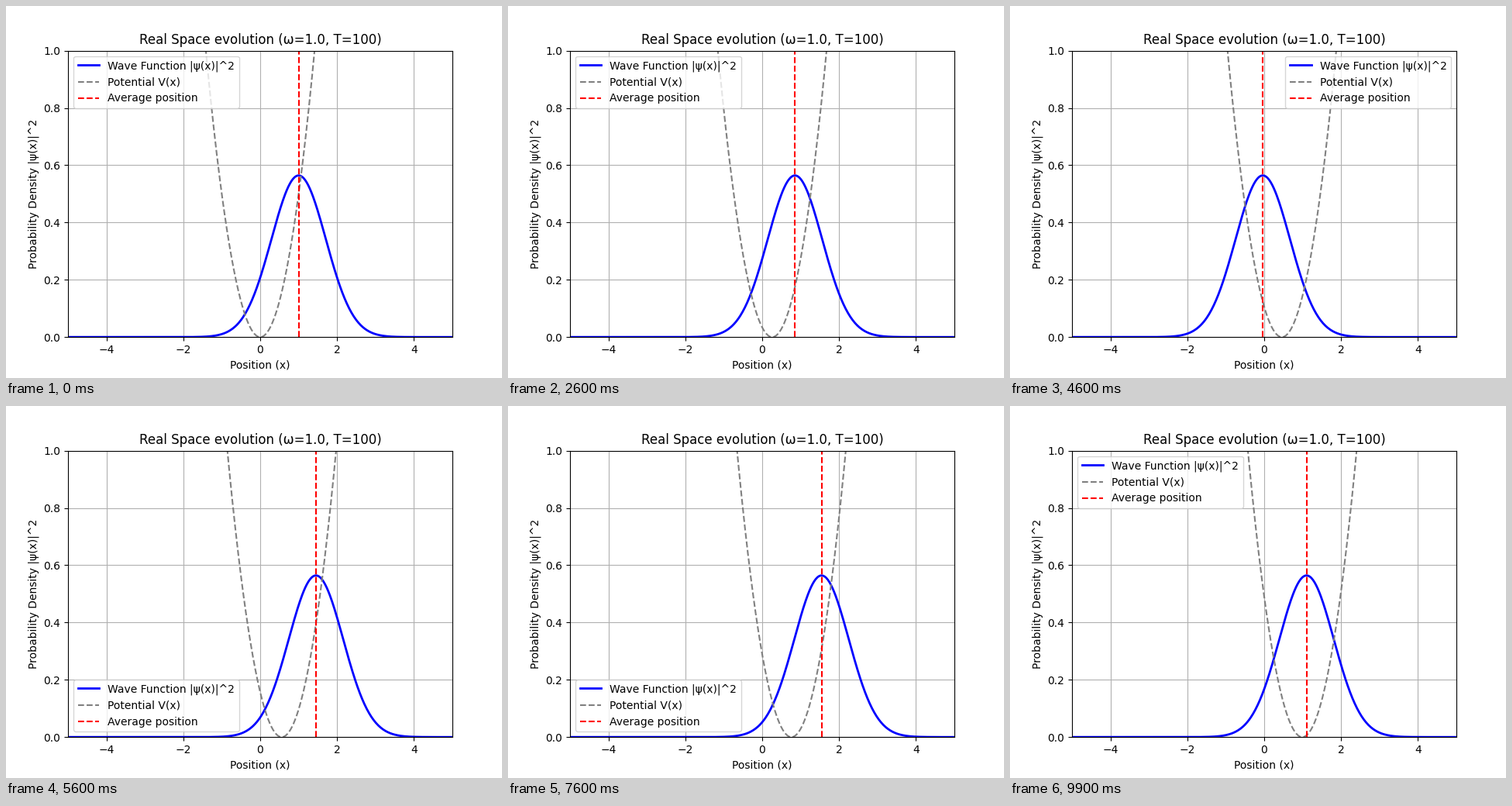
Recreate the animation shown at these times as a matplotlib script. Size 640 by 480 pixels, loop 10000 ms.

```python
import numpy as np
import matplotlib.pyplot as plt
from matplotlib.animation import FuncAnimation

OMEGA = 1.0
T = 100
FRAMES = 100
KICK = 0.072  # sine part of the oscillation about the moving trap

x = np.linspace(-10, 10, 1000)


def trap_center(t):
    return t / T


def mean_position(t):
    return trap_center(t) + np.cos(OMEGA * t) - KICK * np.sin(OMEGA * t)


def density(t):
    return np.sqrt(OMEGA / np.pi) * np.exp(-OMEGA * (x - mean_position(t)) ** 2)


def potential(t):
    return 0.5 * OMEGA**2 * (x - trap_center(t)) ** 2


plt.rcParams["font.family"] = "DejaVu Sans"
fig, ax = plt.subplots(figsize=(6.4, 4.8), dpi=100)
wave, = ax.plot(x, density(0), color="blue", lw=2, label="Wave Function |ψ(x)|^2")
trap, = ax.plot(x, potential(0), color="gray", ls="--", label="Potential V(x)")
mean = ax.axvline(mean_position(0), color="red", ls="--", label="Average position")

ax.set_xlim(-5, 5)
ax.set_ylim(0, 1)
ax.set_xlabel("Position (x)")
ax.set_ylabel("Probability Density |ψ(x)|^2")
ax.set_title(f"Real Space evolution (ω={OMEGA}, T={T})")
ax.grid(True)
ax.legend(loc="best")  # re-placed on every draw as the curves move


def update(t):
    wave.set_ydata(density(t))
    trap.set_ydata(potential(t))
    mean.set_xdata([mean_position(t)] * 2)
    return wave, trap, mean


anim = FuncAnimation(fig, update, frames=FRAMES, interval=100,
                     repeat=True, repeat_delay=0, blit=False)
plt.show()
```
